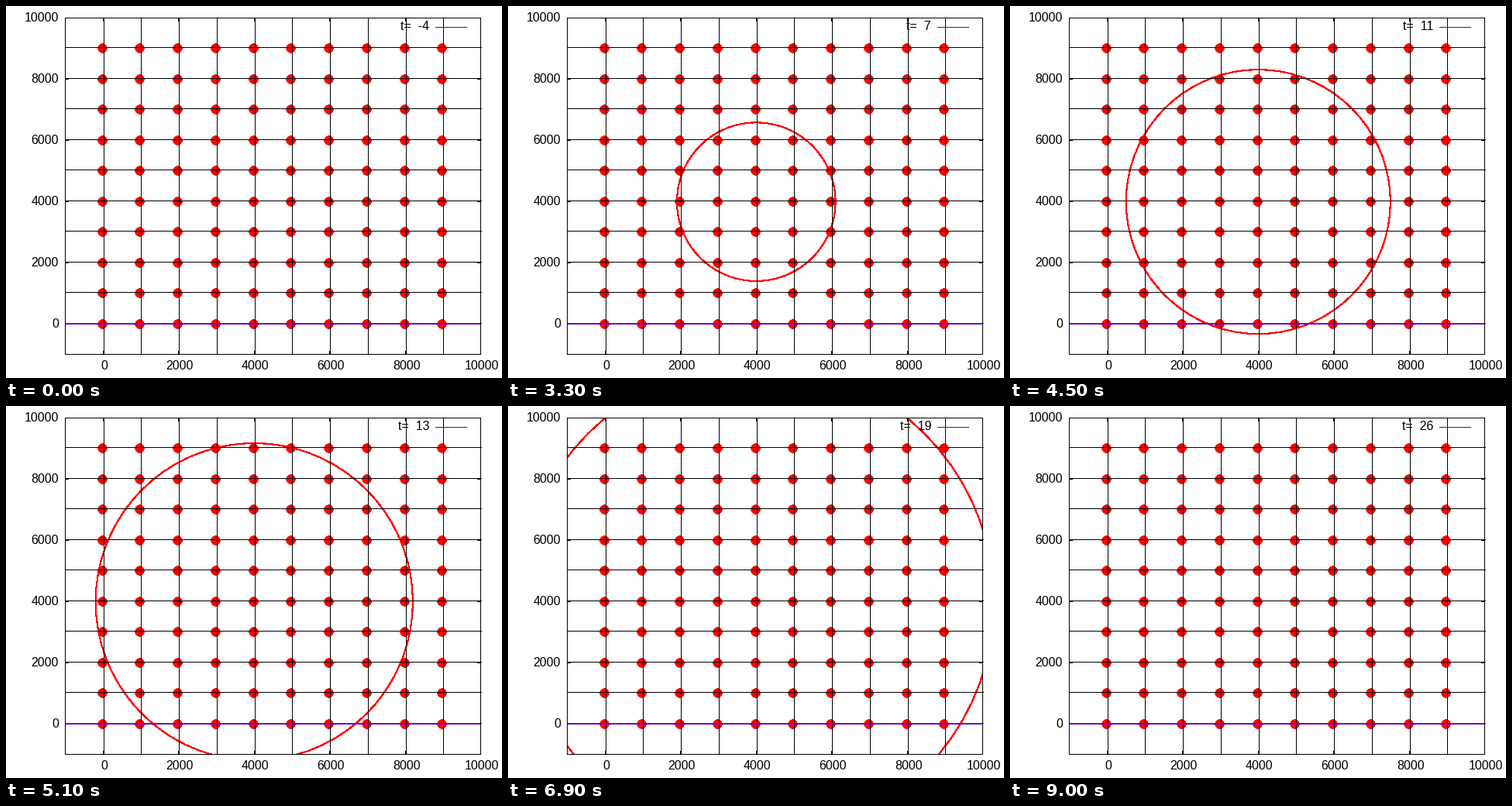
A matplotlib script that plays this animation: 640 by 480 pixels, repeating every 9.3 s.

```python
import numpy as np
import matplotlib.pyplot as plt
from matplotlib.animation import FuncAnimation
from matplotlib.patches import Circle, Rectangle

W, H = 640, 480
LEFT, RIGHT, TOP, BOTTOM = 76, 612, 15, 449
STEP_X, STEP_Y = 536 / 11, 434 / 11      # pixels per 1000 units
FIRST_T, LAST_T = -4, 26
SPEED = 0.35                             # thousands of units per time step
CENTER = (320.3, 252.6)

plt.rcParams["font.family"] = "Liberation Sans"
plt.rcParams["font.size"] = 16

fig = plt.figure(figsize=(W / 72, H / 72), dpi=72, facecolor="white")
ax = fig.add_axes([0, 0, 1, 1])
ax.set_xlim(0, W)
ax.set_ylim(H, 0)
ax.axis("off")


def bar(x, y, w, h, color="black", z=3):
    ax.add_patch(Rectangle((x, y), w, h, fc=color, lw=0, aa=False, zorder=z))


def grid_x(k):
    return round(125.7 + STEP_X * k)


def grid_y(k):
    return round(408.55 - STEP_Y * k)


# Stations
for i in range(10):
    for j in range(10):
        ax.add_patch(Circle((grid_x(i) - 1.5, grid_y(j) + 1.5), 5.6,
                            fc="red", lw=0, aa=False, zorder=1))

# Grid lines and the ground line
for k in range(10):
    bar(grid_x(k), TOP, 1, BOTTOM - TOP + 1)
    bar(LEFT, grid_y(k), RIGHT - LEFT + 2, 1)
bar(LEFT + 1, grid_y(0), RIGHT - LEFT, 2, "#6800d8", 4)

# Frame
for y in (TOP, BOTTOM):
    bar(LEFT, y, RIGHT - LEFT + 1, 1, z=5)
for x in (LEFT, RIGHT):
    bar(x, TOP, 1, BOTTOM - TOP + 1, z=5)

# Ticks and labels
for k in range(0, 11, 2):
    if k < 10:
        x, y = grid_x(k) - 1, grid_y(k) + 1
        for top in (TOP, BOTTOM - 4):
            bar(x, top, 1, 5)
        for left in (LEFT, RIGHT - 4):
            bar(left, y, 5, 1)
    name = str(k * 1000)
    ax.text(grid_x(k) + 0.8, 469, name, ha="center", va="baseline")
    ax.text(68, grid_y(k) + 6, name, ha="right", va="baseline")

# Key
bar(554, 27, 41, 1, "#303030")
clock = ax.text(546, 31, "", ha="right", va="baseline", zorder=6)

# Wave front
angle = np.radians(np.arange(0, 361, 5))
wave, = ax.plot([], [], color="red", lw=1.1, aa=False, snap=False, zorder=2)
wave.set_clip_path(Rectangle((LEFT + 1, TOP + 1), RIGHT - LEFT - 1,
                             BOTTOM - TOP - 1, transform=ax.transData))


def update(n):
    t = FIRST_T + n
    r = max(0, t - 1) * SPEED * STEP_X
    wave.set_data(CENTER[0] + r * np.cos(angle), CENTER[1] - r * np.sin(angle))
    wave.set_visible(r > 0)
    clock.set_text(f"t=  {t}")
    return wave, clock


anim = FuncAnimation(fig, update, frames=LAST_T - FIRST_T + 1, interval=300,
                     repeat=True, repeat_delay=0)
plt.show()
```
